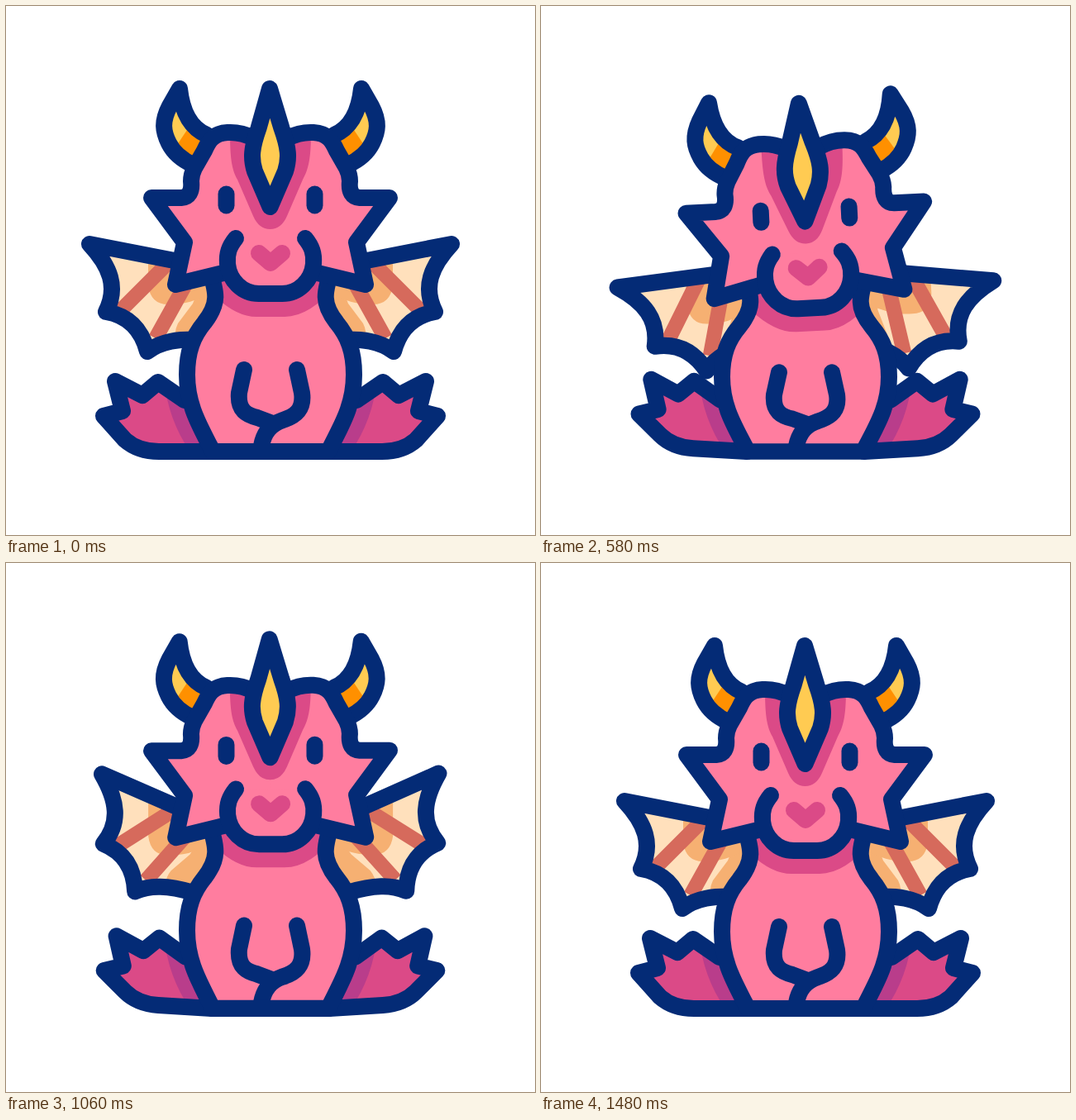
An HTML page that plays this animation: 640x640 px, repeating every 1800 ms.

```html
<!DOCTYPE html>
<html lang="en">
<head>
<meta charset="utf-8">
<title>Flapping dragon</title>
<style>
  html, body { margin: 0; width: 100%; height: 100%; overflow: hidden; background: #fff; }
  svg { display: block; width: 100%; height: 100%; }
  .line { stroke: #042b76; stroke-width: 20; stroke-linecap: round; stroke-linejoin: round; }
  .open { fill: none; }
  .pink { fill: #ff7d9f; }
  .rose { fill: #db4a87; }
  .plum { fill: #b93d8b; }
  .gold { fill: #ffcb52; }
  .amber { fill: #ff9000; }
  .cream { fill: #ffe0bc; }
  .peach { fill: #f6b072; }
  .bars { fill: none; stroke: #d66a5c; stroke-width: 18; }
  .nose { fill: none; stroke: #db4a87; stroke-width: 20; stroke-linecap: round; stroke-linejoin: round; }
</style>
</head>
<body>
<svg id="stage" viewBox="0 0 640 640"></svg>
<script>
const MIRROR = 'transform="matrix(-1 0 0 1 640 0)"';
const WING = 'M265 320L101 288C126 315 136 340 121 370C151 375 165 395 171 418C187 406 208 402 240 404';
const BODY = 'M244 312C256 348 258 360 240 383C226 400 219 418 219 446C219 485 236 510 250 539' +
  'H390C404 510 421 485 421 446C421 418 414 400 400 383C382 360 384 348 396 312';

const twice = id => `<use href="#${id}"/><use href="#${id}" ${MIRROR}/>`;

const wing = side => `
  <clipPath id="clip${side}"><path class="wing${side}" d="${WING}"/></clipPath>
  <g class="wing${side}">
    <path class="cream" d="${WING}"/>
    <path class="peach" d="M229 325Q233 346 226 360L208 384Q203 394 206 402L236 406L262 340V325Z"/>
  </g>
  <g clip-path="url(#clip${side})">
    <path class="peach front${side}" d="M172 270V338Q175 361 196 361Q216 361 228 356L270 340V270Z"/>
  </g>
  <g class="wing${side}">
    <path class="bars" d="M197 310L139 368M231 312L181 402"/>
    <path class="line open" d="${WING}"/>
  </g>`;

stage.innerHTML = `
  <defs>
    <clipPath id="torso"><path class="body" d="${BODY}"/></clipPath>
    <g id="foot">
      <path class="rose sole"/>
      <path class="plum shade"/>
      <path class="line open sole"/>
    </g>
    <g id="horn">
      <path class="gold" d="M210 100L198 121C188 140 190 152 197 166C203 178 213 186 226 192L243 156C224 148 213 128 210 100"/>
      <path class="amber" d="M219 150L207 168L226 192L245 157Z"/>
      <path class="line open" d="M226 192C213 186 203 178 197 166C190 152 188 140 198 121L210 100C213 128 224 148 243 156"/>
    </g>
    <path id="skull" d="M321 160H300Q284 152 268 153C250 154 245 164 240 175L228 196Q224 204 224 212Q226 231 212 232H176L216 286L205 337L267 322H321"/>
    <path id="eye" class="line" d="M266.5 227.5V241.5"/>
  </defs>
  ${wing('L')}
  <g ${MIRROR}>${wing('R')}</g>
  ${twice('foot')}
  <path class="pink body" d="${BODY}"/>
  <g clip-path="url(#torso)">
    <path class="rose frontL" d="M238 335Q272 376 303 376H337Q368 376 402 335V260H238Z"/>
  </g>
  <g class="line open body">
    <path d="M288 440L282 468C280 490 292 495 304 498L320 504M352 440L358 468C361 490 348 497 335 501C320 506 312 516 309 532"/>
    <path d="${BODY}"/>
  </g>
  <g class="head">${twice('horn')}<g class="pink">${twice('skull')}</g></g>
  <path class="rose frontL" d="M271 153C271 188 274 199 280 210L299 254Q306 270 319.5 270Q333 270 340 254L359 210C365 199 369 188 369 153Z"/>
  <g class="line open head">${twice('skull')}</g>
  <g class="frontL">
    ${twice('eye')}
    <path class="line gold" d="M319 100L305.500 148C297 172 296 184 301 200L319.500 243L338 200C343 184 342 172 333.500 148Z"/>
    <path class="line pink" d="M278 281C270 291 267 299 268 312C270 332 286 348 306 348H334C354 348 370 332 372 312C373 299 370 291 362 281"/>
    <path class="nose" d="M306 299L320 311L334 299"/>
  </g>`;

// Keys are [frame, value] pairs at 50 frames per second.
const WING_L = [[10, 0], [19, 17], [28, -20], [37, 17], [46, -20], [55, 17], [64, -20], [74, 0]];
const WING_R = WING_L.map(([f, v]) => [f, Math.max(v, -17)]);
const TILT = [[10, 0], [19, 2.5], [28, -3], [37, 2], [46, -1], [55, 0]];
const BOB = [[10, 0], [15, -31], [20, -16], [29, 17.5], [38, 28.5], [46, 32], [58, -31], [74, 0]];
const LIFT = [[10, 0], [18, 1], [29, .34], [38, .08], [47, 0], [62, 1], [74, 0]];

const slope = (a, b) => (b[1] - a[1]) / (b[0] - a[0]);

// Smooth curve through the keys, flat at every turning point.
function track(keys, f) {
  const last = keys.length - 1;
  if (f <= keys[0][0]) return keys[0][1];
  if (f >= keys[last][0]) return keys[last][1];
  const i = keys.findIndex(k => k[0] > f) - 1;
  const tangent = n => {
    if (n === 0 || n === last) return 0;
    const p = slope(keys[n - 1], keys[n]), q = slope(keys[n], keys[n + 1]);
    return p * q > 0 ? 2 * p * q / (p + q) : 0;
  };
  const [f0, v0] = keys[i], [f1, v1] = keys[i + 1];
  const span = f1 - f0, u = (f - f0) / span, w = 1 - u;
  return v0 * w * w * (1 + 2 * u) + v1 * u * u * (3 - 2 * u)
    + span * u * w * (tangent(i) * w - tangent(i + 1) * u);
}

function set(selector, name, value) {
  for (const el of stage.querySelectorAll(selector)) el.setAttribute(name, value);
}

// Formats a foot point turned about the heel.
const turned = degrees => (x, y) => {
  const a = degrees * Math.PI / 180, c = Math.cos(a), s = Math.sin(a);
  const dx = x - 248, dy = y - 523;
  return `${(248 + dx * c - dy * s).toFixed(2)} ${(523 + dx * s + dy * c).toFixed(2)} `;
};

function drawFeet(f) {
  const up = track(LIFT, f), down = f > 18 && f < 62 ? 1 - up : 0;
  const toe = turned(10 * up - 3.5 * down), base = turned(10 * up);
  set('.sole', 'd', `M${base(250, 539)}L${base(185, 539)}Q${base(160, 539)}${base(144, 525)}` +
    `L${toe(118, 496)}L${toe(141, 490)}L${toe(132, 454)}L${toe(165, 471)}L${toe(184, 455)}L${toe(216, 477)}`);
  set('.shade', 'd', `M192 460Q198 500 218 532L${base(250, 539)}L${toe(216, 477)}Z`);
}

function draw(now) {
  const f = now % 1800 / 20;
  const bob = track(BOB, f), tilt = track(TILT, f);
  const nod = (dy, angle) => `translate(0 ${dy}) rotate(${angle} 320 245)`;
  set('.wingL', 'transform', `rotate(${track(WING_L, f)} 257 340)`);
  set('.wingR', 'transform', `rotate(${track(WING_R, f)} 257 340)`);
  // The face travels further than the skull behind it.
  set('.head', 'transform', nod(bob * .66, tilt));
  set('.frontL', 'transform', nod(bob, tilt));
  set('.frontR', 'transform', nod(bob, -tilt));
  set('.body', 'transform', `translate(0 540) scale(1 ${1 - bob / 580}) translate(0 -540)`);
  drawFeet(f);
}

const start = performance.now();
function loop() {
  draw(performance.now() - start);
  requestAnimationFrame(loop);
}
loop();
</script>
</body>
</html>
```
